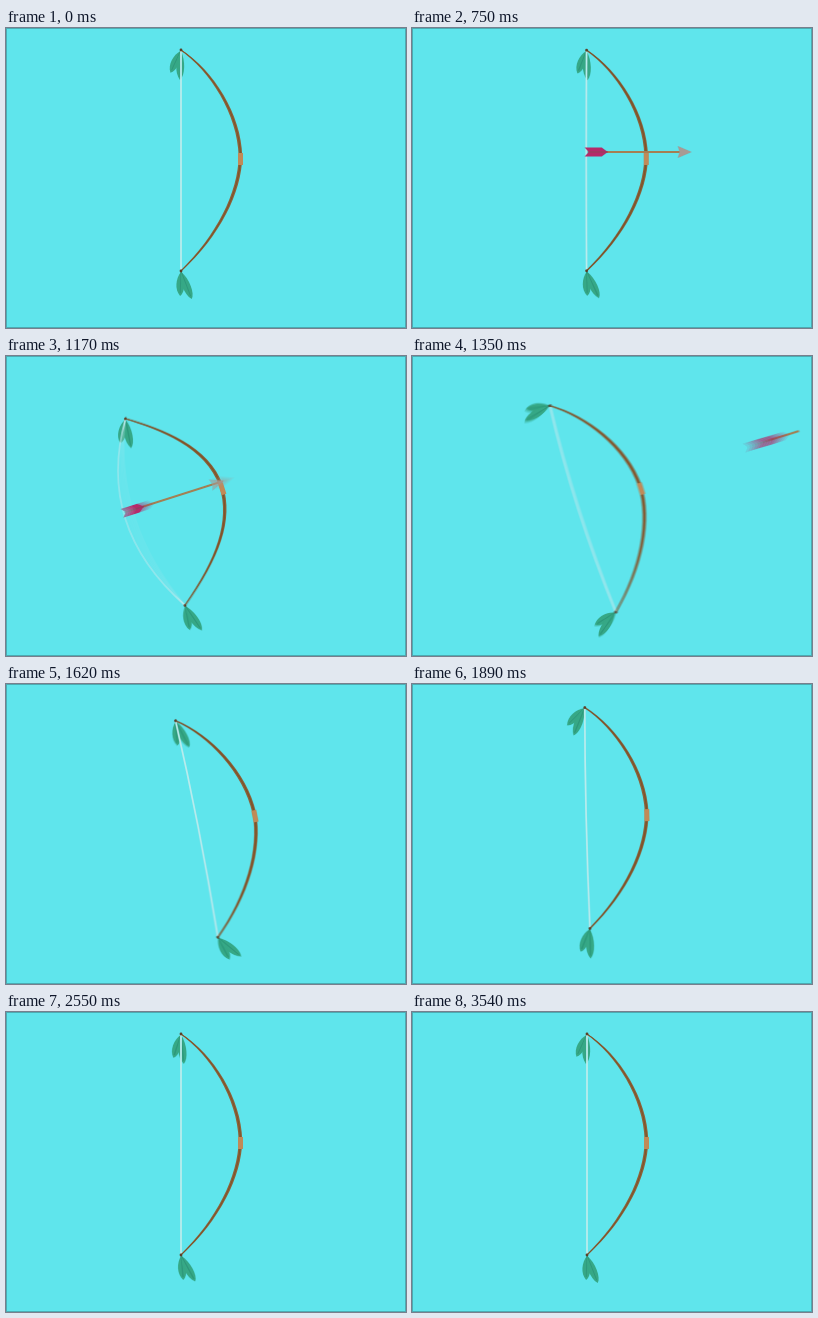
An HTML page with a canvas for the animation above (3600 ms loop, 400 px wide and 300 px high).

```html
<!DOCTYPE html>
<html>
<head>
<meta charset="utf-8">
<title>Bow and arrow</title>
<style>
html, body { margin: 0; width: 100%; height: 100%; overflow: hidden; background: #5fe5ec; }
canvas { display: block; }
</style>
</head>
<body>
<canvas id="stage" width="400" height="300"></canvas>
<script>
const LOOP = 3600, STEP = 30, SHUTTER = 20, SAMPLES = 10;
const ENTER = 440, DRAW = 720, RELEASE = 1170, SWEEP = RELEASE + 120;
const STRING_X = -59.5, PULL = 42;
const stage = document.getElementById('stage').getContext('2d');
const layer = document.createElement('canvas');
layer.width = 400;
layer.height = 300;
const c = layer.getContext('2d');
const { PI, sin, cos, exp } = Math;
const rad = deg => deg * PI / 180;

const progress = (t, from, to) => Math.min(1, Math.max(0, (t - from) / (to - from)));

function ease(t, from, to) {
  const u = progress(t, from, to);
  return u * u * (3 - 2 * u);
}

function backOut(u, overshoot = 1.15) {
  const v = u - 1;
  return 1 + (overshoot + 1) * v ** 3 + overshoot * v ** 2;
}

// Feathers lift while the bow is drawn, then swing with a fading amplitude.
function swingAt(t) {
  if (t < SWEEP) return 21 * sin(PI * progress(t, DRAW, SWEEP));
  const s = t - RELEASE;
  return 14400 / s * cos(2 * PI * s / 480) * (1 - ease(t, 2500, LOOP));
}

// Positions are relative to the bow's grip.
function poseAt(t) {
  const draw = ease(t, DRAW, RELEASE), loose = t > RELEASE, s = Math.max(0, t - RELEASE);
  const bend = 1.55 * draw * exp(-s / 100);
  const tip = STRING_X - 7.5 * bend;
  const turn = -17.7 * draw ** 2 * (1 - ease(t, 1350, 2000));
  const lunge = (-18.5 * draw + 34 * ease(t, 1200, 1560)) * (1 - ease(t, 1560, 1920));
  const hum = -30 / (1 + s / 30) * cos(2 * PI * s / 180) * (1 - ease(t, 1900, 2600));
  return {
    x: 234.5 + lunge,
    y: 130.5 - turn / 10,
    turn: rad(turn),
    tip,
    top: -108.5 + 8.5 * bend,
    bottom: 112.5 - 8 * bend,
    bend,
    string: loose ? tip + hum : STRING_X - PULL * draw,
    arrow: loose ? 1.256 * s - PULL : -330 * (1 - backOut(progress(t, ENTER, DRAW))) - PULL * draw,
    swing: swingAt(t)
  };
}

function stroke(color, width) {
  c.strokeStyle = color;
  c.lineWidth = width;
  c.stroke();
}

function fill(color) {
  c.fillStyle = color;
  c.fill();
}

function polygon(color, ...points) {
  c.beginPath();
  points.forEach(p => c.lineTo(...p));
  fill(color);
}

function feather(angle, length) {
  c.save();
  c.rotate(-rad(angle));
  c.beginPath();
  c.moveTo(0, 1);
  c.bezierCurveTo(-5, length * .3, -6, length * .75, 0, length);
  c.bezierCurveTo(5, length * .85, 5, length * .35, 0, 1);
  fill('#36a886');
  c.beginPath();
  c.moveTo(0, 0);
  c.lineTo(0, length - 3);
  stroke('#2d967a', .8);
  c.restore();
}

function feathers(x, y, turn, angle) {
  c.save();
  c.translate(x, y);
  c.rotate(-turn);
  feather(angle - 23, 25);
  feather(angle, 30);
  c.restore();
}

function drawBow({ tip, top, bottom, bend }) {
  const half = d => {
    c.lineTo(tip + d / 2, top);
    c.bezierCurveTo(tip + 31 + d, top + 21, d - 1, -44, d, -2.5);
    c.bezierCurveTo(d - .5, 34, tip + 37 + 6 * bend + d, bottom - 35, tip + d / 2, bottom);
  };
  const back = d => {
    c.lineTo(tip + d / 2, bottom);
    c.bezierCurveTo(tip + 37 + 6 * bend + d, bottom - 35, d - .5, 34, d, -2.5);
    c.bezierCurveTo(d - 1, -44, tip + 31 + d, top + 21, tip + d / 2, top);
  };
  c.beginPath();
  half(1.8);
  back(-1.8);
  fill('#8d6238');
  c.beginPath();
  half(0);
  stroke('#7d542c', 1);
  for (const y of [top, bottom]) {
    c.beginPath();
    c.arc(tip, y, 1.4, 0, 2 * PI);
    fill('#5b4028');
  }
  c.fillStyle = '#c08a58';
  c.fillRect(-2.5, -5.5, 5, 12);
}

function drawArrow(offset) {
  c.save();
  c.beginPath();
  c.rect(-240, -250, 408, 500);
  c.clip();
  c.translate(offset + STRING_X - 1.5, -6.5);
  c.beginPath();
  c.moveTo(4, 0);
  c.lineTo(95, 0);
  stroke('#a57f52', 2);
  polygon('#b52a6a', [0, -4.5], [17, -4.5], [23, 0], [17, 4.5], [0, 4.5], [4, 0]);
  c.beginPath();
  c.moveTo(3, 0);
  c.lineTo(23, 0);
  stroke('#94425c', 1.2);
  polygon('#a89a94', [93, -6], [107, 0], [93, 6], [95, 0]);
  c.restore();
}

function drawScene(t) {
  const p = poseAt(t);
  c.fillStyle = '#5fe5ec';
  c.fillRect(0, 0, 400, 300);
  c.save();
  c.translate(p.x, p.y);
  c.rotate(p.turn);
  feathers(p.tip, p.top, p.turn, p.swing - 2);
  feathers(p.tip, p.bottom, p.turn, p.swing + 21);
  c.beginPath();
  c.moveTo(p.tip, p.top);
  c.quadraticCurveTo(2 * p.string - p.tip, -2, p.tip, p.bottom);
  stroke('#b8eced', 1.8);
  drawBow(p);
  drawArrow(p.arrow);
  c.restore();
  c.strokeStyle = '#4cabb2';
  c.lineWidth = 1;
  c.strokeRect(.5, .5, 399, 299);
}

// Averages several moments within the shutter time for motion blur.
function frame(now) {
  const t = Math.floor(now % LOOP / STEP) * STEP;
  for (let i = 0; i < SAMPLES; i++) {
    drawScene(t + SHUTTER * ((i + .5) / SAMPLES - .5));
    stage.globalAlpha = 1 / (i + 1);
    stage.drawImage(layer, 0, 0);
  }
  requestAnimationFrame(frame);
}
frame(performance.now());
</script>
</body>
</html>
```
